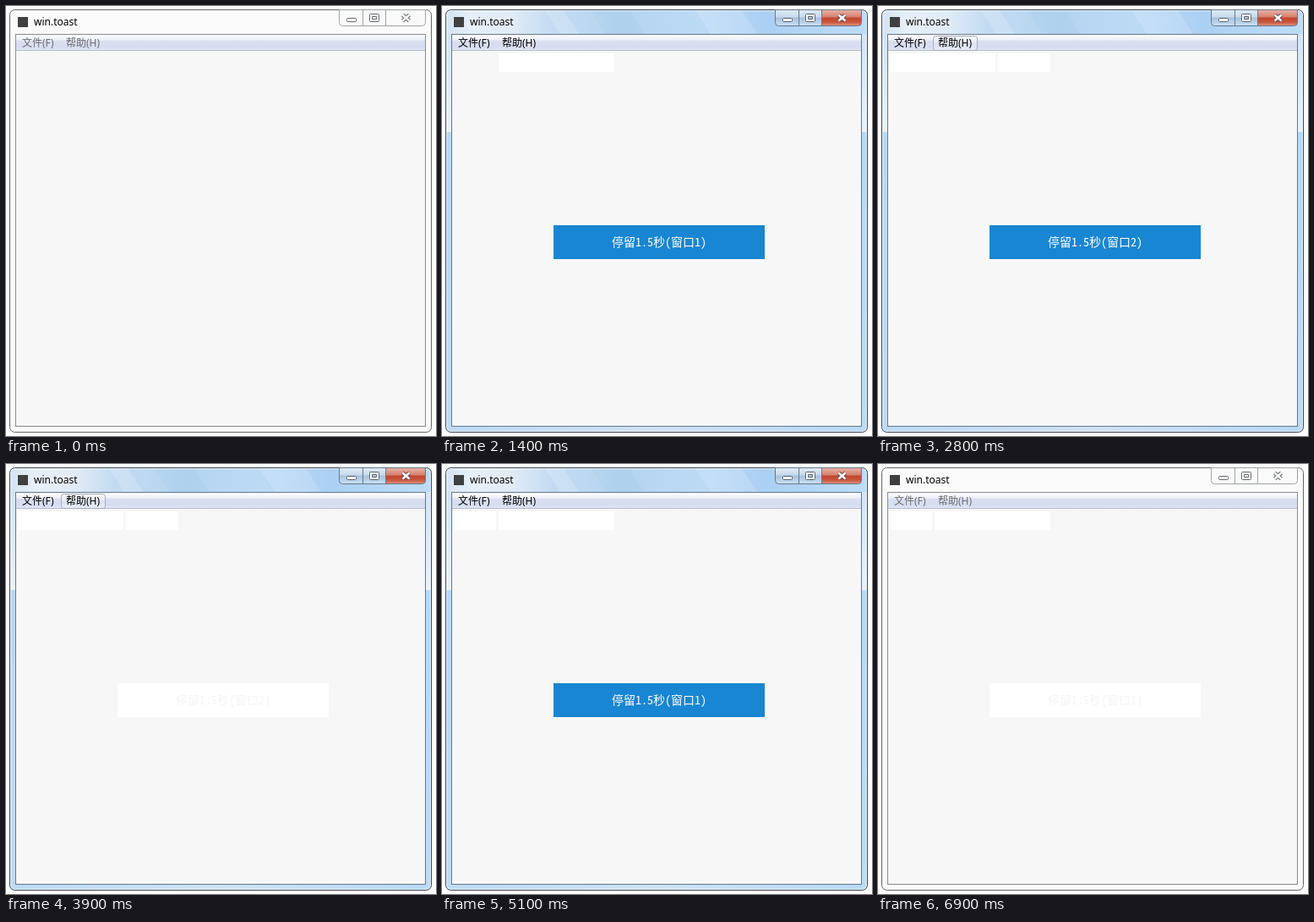
An HTML page with a canvas for the animation above (7000 ms loop, 509 by 508 pixels).

```html
<!DOCTYPE html>
<html lang="zh-CN">
<head>
<meta charset="utf-8">
<title>win.toast</title>
<style>
html, body { margin: 0; width: 100%; height: 100%; overflow: hidden; background: #fdfdfd; }
canvas { display: block; }
</style>
</head>
<body>
<canvas id="stage" width="509" height="508"></canvas>
<script>
const ctx = document.getElementById('stage').getContext('2d');
const LOOP = 7000;
const CLIENT = '#f7f7f7';
const UI_FONT = '12px "Noto Sans", "Noto Sans CJK SC", "Noto Sans CJK", sans-serif';
const TOAST_FONT = '14px "Noto Sans Mono CJK SC", "Noto Sans CJK SC", "Noto Sans CJK", monospace';

const HELP = { label: '帮助(H)', textX: 71, barX: 65, barW: 53, x: 64, w: 143, entry: '关于(A) ...' };
const FILE = { label: '文件(F)', textX: 19, barX: 13, barW: 50, x: 12, w: 130, entry: '打开(O)' };

// Each opening: fade-in opacity per 100 ms, then hover, then close.
const openings = [
  { menu: HELP, start: 600, fade: [0.2, 0.6, 1], hover: 1100, close: 1200 },
  { menu: FILE, start: 2000, fade: [0.5, 1], hover: 2300, close: 2600 },
  { menu: HELP, start: 4400, fade: [0.2, 0.6, 1], hover: 4800, close: 4900 }
];
const barHovers = [
  { menu: FILE, from: 1800, to: 2000 },
  { menu: HELP, from: 2800, to: 4400 }
];
const toasts = [
  { from: 1300, to: 2700, number: 1, fadeIn: true },
  { from: 2700, to: 3900, number: 2 },
  { from: 3900, to: 5000, number: 2, ghost: true },
  { from: 5000, to: 6200, number: 1, fadeIn: true },
  { from: 6200, to: LOOP, number: 1, ghost: true }
];

const during = (t, from, to) => t >= from && t < to;

function rect(x, y, w, h, fill) {
  ctx.fillStyle = fill;
  ctx.fillRect(x, y, w, h);
}

function frame(x, y, w, h, color) {
  ctx.strokeStyle = color;
  ctx.lineWidth = 1;
  ctx.strokeRect(x + 0.5, y + 0.5, w - 1, h - 1);
}

function roundBox(x, y, w, h, radius, fill, stroke) {
  ctx.beginPath();
  ctx.roundRect(x + 0.5, y + 0.5, w - 1, h - 1, radius);
  if (fill) { ctx.fillStyle = fill; ctx.fill(); }
  if (stroke) { ctx.strokeStyle = stroke; ctx.lineWidth = 1; ctx.stroke(); }
}

function gradient(x0, y0, x1, y1, ...stops) {
  const g = ctx.createLinearGradient(x0, y0, x1, y1);
  stops.forEach(([at, color]) => g.addColorStop(at, color));
  return g;
}

const vertical = (y0, y1, ...stops) => gradient(0, y0, 0, y1, ...stops);

function text(str, x, y, color, font = UI_FONT, align = 'left') {
  ctx.font = font;
  ctx.textAlign = align;
  ctx.fillStyle = color;
  ctx.fillText(str, x, y);
}

function streak(x, w, color) {
  ctx.beginPath();
  ctx.moveTo(x, 5);
  ctx.lineTo(x + w, 5);
  ctx.lineTo(x + w + 18, 33);
  ctx.lineTo(x + 18, 33);
  ctx.fillStyle = color;
  ctx.fill();
}

function drawGlass() {
  ctx.save();
  ctx.beginPath();
  ctx.roundRect(4.5, 4.5, 499, 499, 6);
  ctx.clip();
  rect(4, 4, 500, 30, gradient(4, 0, 504, 0,
    [0, '#d3e3f2'], [0.06, '#e6eff8'], [0.16, '#e0ebf6'], [0.25, '#c3dbf2'],
    [0.42, '#b5d4ef'], [0.6, '#bddaf5'], [0.76, '#abd0f3'], [1, '#bddcf7']));
  streak(122, 22, 'rgba(255,255,255,.16)');
  streak(176, 46, 'rgba(140,188,230,.14)');
  streak(300, 55, 'rgba(255,255,255,.14)');
  rect(4, 33, 500, 116, vertical(33, 149, [0, '#d2e4f5'], [1, '#e9f2fa']));
  rect(4, 149, 500, 355, vertical(149, 504, [0, '#b5d9f9'], [1, '#bedbf5']));
  rect(12, 497, 485, 7, gradient(12, 0, 497, 0, [0, '#bcdaf5'], [0.5, '#cde2f6'], [1, '#b7d8f7']));
  ctx.restore();
  roundBox(5, 5, 498, 498, 5, null, 'rgba(255,255,255,.65)');
}

function drawCross(x, y, outline, fill) {
  for (const [width, color] of [[4.6, outline], [2.4, fill]]) {
    ctx.strokeStyle = color;
    ctx.lineWidth = width;
    ctx.beginPath();
    ctx.moveTo(x - 4, y - 3.5); ctx.lineTo(x + 4, y + 3.5);
    ctx.moveTo(x + 4, y - 3.5); ctx.lineTo(x - 4, y + 3.5);
    ctx.stroke();
  }
}

function drawCaptionButtons(active) {
  const edge = active ? '#66788c' : '#a0a4a8';
  const glyph = active ? '#56616f' : '#63666c';
  ctx.save();
  ctx.beginPath();
  ctx.roundRect(394.5, 4.5, 102, 19, [0, 0, 4, 4]);
  ctx.clip();
  if (active) {
    rect(394, 4, 56, 20, vertical(4, 24,
      [0, '#e2edf7'], [0.45, '#c6d9eb'], [0.5, '#a7c1da'], [1, '#cbe2f5']));
    rect(450, 4, 47, 20, vertical(4, 24,
      [0, '#e9b5aa'], [0.45, '#d6806e'], [0.5, '#c04630'], [0.75, '#c9553d'], [1, '#e39c85']));
  } else {
    rect(394, 4, 103, 20, '#fafafa');
  }
  ctx.restore();
  roundBox(394, 4, 103, 20, [0, 0, 4, 4], null, edge);
  rect(422, 5, 1, 18, edge);
  rect(449, 5, 1, 18, edge);

  roundBox(403, 14, 12, 5, 1, '#fff', glyph);
  roundBox(430, 9, 12, 10, 1, '#fff', glyph);
  roundBox(433, 12, 6, 4, 0, active ? '#b7cde2' : '#fafafa', glyph);
  drawCross(473.5, 14, active ? '#6b4a4a' : glyph, '#fff');
}

function drawWindow(active) {
  rect(0, 0, 509, 508, '#fdfdfd');
  roundBox(4, 4, 500, 500, 6, '#fafafa');
  if (active) drawGlass();
  roundBox(4, 4, 500, 500, 6, null, active ? '#3d4650' : '#666');
  drawCaptionButtons(active);

  rect(14, 13, 12, 12, '#404040');
  ctx.save();
  if (active) { ctx.shadowColor = '#fff'; ctx.shadowBlur = 8; }
  text('win.toast', 33, 23, '#000');
  ctx.restore();

  rect(12, 34, 484, 462, CLIENT);
  rect(12, 34, 484, 19, vertical(34, 53,
    [0, '#fefefe'], [0.32, '#eceff8'], [0.4, '#d9dff0'], [0.75, '#d7ddf1'], [1, '#e1e6f5']));
  rect(12, 52, 484, 1, '#b6bccc');
  frame(11, 33, 486, 464, active ? '#66788b' : '#8b8b8b');
}

function drawBarBox(menu, pressed) {
  const fill = pressed
    ? vertical(35, 53, [0, '#b9bfcc'], [0.4, '#d0d5e2'], [0.5, '#bec4d4'], [1, '#d0d6e5'])
    : vertical(35, 53, [0, '#f8f9fc'], [0.45, '#e8ebf4'], [0.5, '#dce1ef'], [1, '#e9edf7']);
  roundBox(menu.barX, 35, menu.barW, 18, 3, fill, pressed ? '#6a707d' : '#a5abba');
}

function drawMenuBar(t, active) {
  for (const h of barHovers) if (during(t, h.from, h.to)) drawBarBox(h.menu, false);
  for (const o of openings) if (during(t, o.start, o.close)) drawBarBox(o.menu, true);
  for (const menu of [FILE, HELP]) text(menu.label, menu.textX, 48, active ? '#000' : '#6d6d6d');
}

function drawHighlight(menu) {
  roundBox(menu.x + 3, 56, menu.w - 6, 22, 3,
    vertical(56, 78, [0, '#f1f5fb'], [1, '#e2ebf8']), '#aecff7');
}

function drawEntry(menu) {
  text(menu.entry, menu.x + 34, 71, '#000');
}

function drawMenu(menu, opacity, hovered) {
  rect(menu.x, 53, menu.w, 28, '#f9fafb');
  ctx.globalAlpha = opacity;
  rect(menu.x, 53, menu.w, 28, '#f3f4f5');
  frame(menu.x, 53, menu.w, 28, '#979797');
  rect(menu.x + 29, 55, 1, 24, '#e2e3e3');
  rect(menu.x + 30, 55, 1, 24, '#fff');
  if (hovered) drawHighlight(menu);
  drawEntry(menu);
  ctx.globalAlpha = 1;
}

// A closed menu leaves its entry area white until another menu covers it.
function drawMenus(t) {
  for (const { menu, start, fade, hover, close } of openings) {
    if (t < start) continue;
    if (t < close) {
      const step = Math.min(Math.floor((t - start) / 100), fade.length - 1);
      drawMenu(menu, fade[step], t >= hover);
      continue;
    }
    rect(menu.x, 53, menu.w, 28, CLIENT);
    rect(menu.x + 3, 56, menu.w - 6, 22, '#fff');
    if (t < close + 100) {
      ctx.globalAlpha = 0.5;
      drawHighlight(menu);
      drawEntry(menu);
      ctx.globalAlpha = 1;
    }
  }
}

function drawToast(t) {
  const toast = toasts.find(({ from, to }) => during(t, from, to));
  if (!toast) return;
  if (toast.fadeIn && t < toast.from + 100) {
    rect(132, 259, 250, 40, '#fff');
    ctx.globalAlpha = 0.6;
  }
  rect(132, 259, 250, 40, toast.ghost ? '#fff' : '#1886d2');
  text(`停留1.5秒(窗口${toast.number})`, 257, 284,
    toast.ghost ? '#f5f5f5' : '#fff', TOAST_FONT, 'center');
  ctx.globalAlpha = 1;
}

function draw(t) {
  const active = during(t, 600, 6900);
  drawWindow(active);
  drawMenuBar(t, active);
  drawMenus(t);
  drawToast(t);
}

const began = performance.now();
function tick() {
  draw((performance.now() - began) % LOOP);
  requestAnimationFrame(tick);
}
tick();
</script>
</body>
</html>
```
